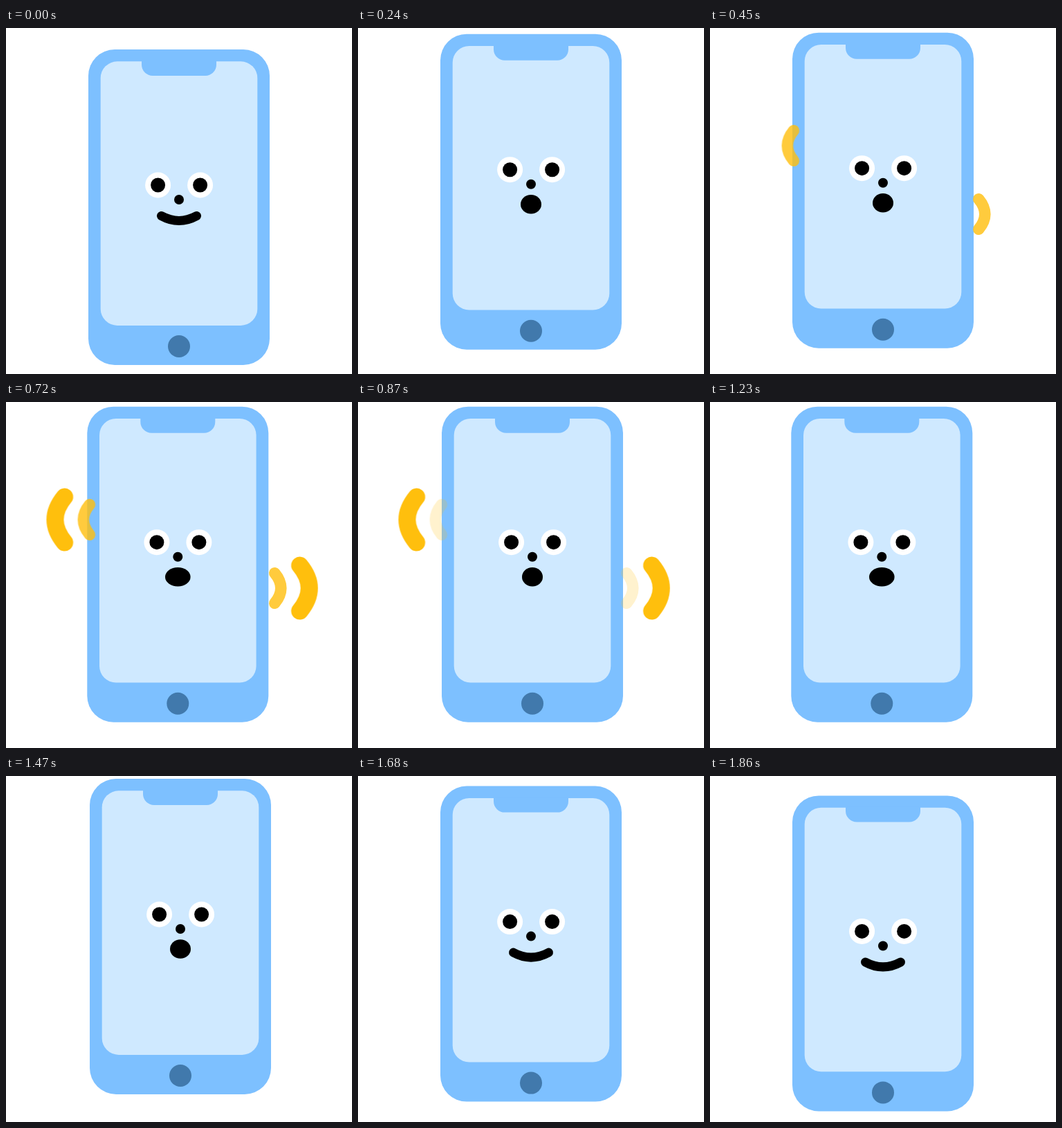
These frames come from a looping animation (500 px wide and 500 px high, 1890 ms). An HTML page:

```html
<!DOCTYPE html>
<html lang="en">
<head>
<meta charset="utf-8">
<title>Ringing phone</title>
<style>
html, body { margin: 0; width: 100%; height: 100%; overflow: hidden; background: #fff; }
svg { display: block; width: 100%; height: 100%; }
</style>
</head>
<body>
<svg viewBox="0 0 500 500">
  <g id="phone">
    <rect x="119" y="31" width="262" height="456" rx="38" fill="#7dc0ff"/>
    <rect x="136.7" y="48.3" width="226.6" height="381.6" rx="24" fill="#cfe9ff"/>
    <path d="M196 47H304V53A16 16 0 0 1 288 69H212A16 16 0 0 1 196 53Z" fill="#7dc0ff"/>
    <circle cx="250" cy="460" r="16" fill="#4179ac"/>
    <g fill="#fff"><circle cx="219.6" cy="227" r="18.5"/><circle cx="280.6" cy="227" r="18.5"/></g>
    <circle cx="219.6" cy="227" r="10.5"/><circle cx="280.6" cy="227" r="10.5"/>
    <circle cx="250" cy="248" r="7"/>
    <path id="smile" d="M224.5 271.5Q250 285.5 275.5 271.5" fill="none" stroke="#000" stroke-width="13" stroke-linecap="round"/>
    <ellipse id="gasp" cx="250" cy="277" rx="15" ry="13.8"/>
  </g>
  <g fill="none" stroke="#ffbf0d" stroke-width="16.6" stroke-linecap="round">
    <g id="near"><path/><path/></g>
    <g id="far"><path/><path/></g>
  </g>
</svg>
<script>
const LOOP = 1890, STEP = 30;
const $ = id => document.getElementById(id);
const ramp = (t, a, b) => Math.min(1, Math.max(0, (t - a) / (b - a)));
const smooth = p => p * p * (3 - 2 * p);
const mix = (a, b, p) => a + (b - a) * p;

// A pair of arcs, left and right of the phone, at a distance from the middle.
function placeWaves(id, distance, scale, opacity) {
  const group = $(id);
  group.setAttribute('opacity', opacity);
  [-1, 1].forEach((side, i) => {
    const path = group.children[i];
    path.setAttribute('d', 'M-4.3 -21.8Q13.7 0 -4.3 21.8');
    path.setAttribute('transform',
      `translate(${254.6 + side * distance} ${side < 0 ? 170 : 269}) scale(${side * scale} ${scale})`);
  });
}

function lift(t) {
  if (t < 330) return mix(0, -26, 1 - (1 - t / 330) ** 1.5);
  if (t < 1350) return mix(-26, -24.3, smooth(ramp(t, 330, 450)));
  if (t < 1470) return mix(-24.3, -27, smooth(ramp(t, 1350, 1470)));
  return mix(-27, 0, ramp(t, 1470, LOOP) ** 1.35);
}

function draw(t) {
  const ringing = t >= 600 && t < 1500;
  const left = ringing && t % 300 < 150;
  const shake = !ringing ? 0 : left ? -1.7 : 2;
  $('phone').setAttribute('transform', `translate(${shake} ${lift(t)})`);

  const awake = t >= 240 && t < 1620;
  $('smile').style.display = awake ? 'none' : '';
  $('gasp').style.display = awake ? '' : 'none';
  $('gasp').setAttribute('rx', left ? 18.3 : 15);

  placeWaves('near', 138, 1, 0.8 * ramp(t, 360, 450) * (1 - ramp(t, 780, 900)));
  const out = ramp(t, 510, 600), leave = ramp(t, 1005, 1080);
  placeWaves('far',
    mix(mix(138, 176.5, out), 206.5, leave),
    mix(mix(1, 1.51, out), 1.9, leave),
    t < 510 ? 0 : mix(0.8, 1, out) * (1 - ramp(t, 1080, 1170)));
}

const start = performance.now();
function tick() {
  const t = (performance.now() - start) % LOOP;
  draw(Math.floor(t / STEP) * STEP);
  requestAnimationFrame(tick);
}
tick();
</script>
</body>
</html>
```
